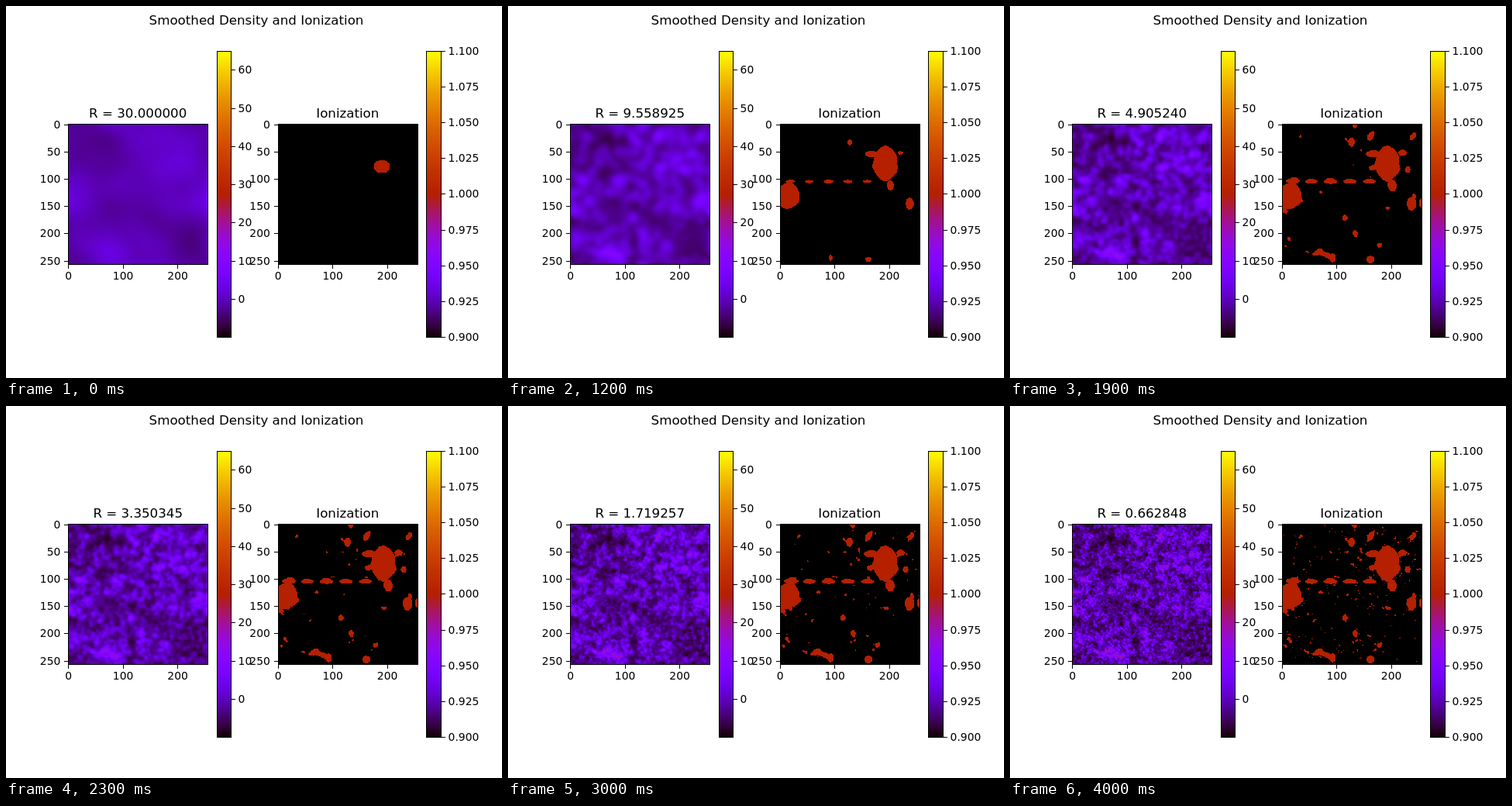
Write an HTML page with a canvas that moves like this. It is 640 px wide and 480 px high and loops after 4.1 s.

```html
<!DOCTYPE html>
<html lang="en">
<head>
<meta charset="utf-8">
<title>Smoothed Density and Ionization</title>
<style>
  html, body { margin: 0; width: 100%; height: 100%; overflow: hidden; background: #fff; }
  canvas, svg { position: absolute; left: 0; top: 0; width: 640px; height: 480px; }
  text { font-family: "DejaVu Sans", sans-serif; fill: #000; }
</style>
</head>
<body>
<canvas id="plot" width="640" height="480"></canvas>
<svg id="labels" viewBox="0 0 640 480"></svg>
<script>
const N = 256, STEPS = 41, STEP_MS = 100;
const TOP = 152.22, SIZE = 180.36, UNIT = SIZE / N;
const BAR_TOP = 57.6, BAR_BOTTOM = 427.2, BAR_H = BAR_BOTTOM - BAR_TOP;
const ctx = document.getElementById('plot').getContext('2d');
const svg = document.getElementById('labels');

const clamp = (v, lo, hi) => Math.max(lo, Math.min(hi, v));
const radius = n => 30 / 1.1 ** n;

// Colour map: r = sqrt(x), g = x^3, b = sin(2 pi x)
const rgb = x => [Math.sqrt(x), x ** 3, Math.max(0, Math.sin(2 * Math.PI * x))]
  .map(c => Math.round(255 * c));
const pack = ([r, g, b]) => (255 << 24 | b << 16 | g << 8 | r) >>> 0;
const palette = Array.from({ length: 256 }, (_, i) => rgb(i / 255));
const packed = Uint32Array.from(palette, pack);

// ---- Fields ----
let seed = 7331;
function random() {
  seed = seed + 0x6D2B79F5 | 0;
  let t = Math.imul(seed ^ seed >>> 15, 1 | seed);
  t = t + Math.imul(t ^ t >>> 7, 61 | t) ^ t;
  return ((t ^ t >>> 14) >>> 0) / 4294967296;
}

// Periodic box filter of fractional width; the result is transposed.
function boxPass(src, width) {
  const out = new Float32Array(N * N);
  const r = (width - 1) / 2, k = Math.floor(r), f = r - k;
  for (let y = 0; y < N; y++) {
    const row = y * N;
    let sum = 0;
    for (let i = -k; i <= k; i++) sum += src[row + (i & 255)];
    for (let x = 0; x < N; x++) {
      const next = src[row + (x + k + 1 & 255)];
      out[x * N + y] = (sum + f * (src[row + (x - k - 1 & 255)] + next)) / width;
      sum += next - src[row + (x - k & 255)];
    }
  }
  return out;
}

function blur(field, sigma) {
  for (let i = 0; i < 6; i++) field = boxPass(field, Math.max(1, 2 * sigma));
  return field;
}

const rms = f => Math.sqrt(f.reduce((s, v) => s + v * v, 0) / f.length);

function noise(sigma) {
  const white = Float32Array.from({ length: N * N }, () => random() + random() + random() - 1.5);
  const f = blur(white, sigma), scale = rms(f);
  return f.map(v => v / scale);
}

// Calls fn(index, u) near an ellipse, with u = 1 on its edge.
function around([cx, cy, rx, ry], reach, fn) {
  const x0 = Math.max(0, Math.ceil(cx - rx * reach)), x1 = Math.min(N - 1, cx + rx * reach);
  const y0 = Math.max(0, Math.ceil(cy - ry * reach)), y1 = Math.min(N - 1, cy + ry * reach);
  for (let y = y0; y <= y1; y++)
    for (let x = x0; x <= x1; x++)
      fn(y * N + x, Math.hypot((x - cx) / rx, (y - cy) / ry));
}

// Wide clumps and voids: x, y, strength
const clumps = [
  [55, 45, -.7], [190, 72, .3], [20, 125, .3], [100, 160, -.4], [160, 165, -.4], [240, 215, -.3], [75, 228, .25]
];

// The main bubble stretches from its first shape to its last one.
const firstShape = [189, 77, 15, 12], lastShape = [192, 71, 22, 32];
const mainBubble = n => {
  const p = Math.min(1, n / 10);
  return firstShape.map((v, i) => v + (lastShape[i] - v) * p);
};

// Other bubbles: x, y, rx, ry, and a chain across the left half
const bubbles = [
  [14, 130, 21, 23], [127, 33, 6, 8], [201, 111, 8, 11], [166, 54, 14, 7], [236, 145, 8, 12],
  [254, 143, 4, 8], [161, 246, 8, 7], [92, 243, 5, 8], [219, 52, 8, 5], [229, 83, 5, 6]
];
for (let x = 18; x < 165; x += 35) bubbles.push([x, 104, 12, 4.5]);

// A bubble appears once the smoothing radius falls to about its own size.
const meanRadius = ([, , rx, ry]) => Math.sqrt(rx * ry);
const birth = shape => Math.max(1, Math.log(30 / (1.2 * meanRadius(shape) + 2)) / Math.log(1.1));

function makeDensity() {
  const log = new Float32Array(N * N);
  for (let sigma = .7; sigma < 8; sigma *= 2)
    noise(sigma).forEach((v, i) => { log[i] += .24 * v; });
  noise(3.5).forEach((v, i) => { log[i] += .35 * (.8 - Math.abs(v)); });
  for (const [x, y, amp] of clumps)
    around([x, y, 22, 22], 3, (i, u) => { log[i] += amp * Math.exp(-u * u / 2); });
  for (const shape of bubbles)
    if (meanRadius(shape) < 15)
      around(shape, 2.5, (i, u) => { log[i] += .35 * Math.exp(-u * u); });
  return log.map(v => 10.5 * Math.exp((v > .9 ? .9 + (v - .9) / 2 : v) - .2) - 10);
}

function toCanvas(pixels) {
  const c = document.createElement('canvas');
  c.width = c.height = N;
  c.getContext('2d').putImageData(new ImageData(new Uint8ClampedArray(pixels.buffer), N, N), 0, 0);
  return c;
}

function makeSteps() {
  const density = makeDensity(), coarse = blur(density, 14);
  const black = pack([0, 0, 0]), red = pack(rgb(.5)), partial = pack(rgb(.16));
  const mask = new Uint32Array(N * N).fill(black);
  return Array.from({ length: STEPS }, (_, n) => {
    const smooth = blur(density, .6 * radius(n));
    const detail = smooth.map((v, i) => v - coarse[i]);
    const fill = (shape, grown) => around(shape, 1.4, (i, u) => {
      if (u < grown + .02 * Math.min(14, detail[i])) mask[i] = red;
    });
    fill(mainBubble(n), 1);
    for (const shape of bubbles) {
      const age = n - birth(shape);
      if (age >= 0) fill(shape, .6 + .4 * Math.min(1, age / 6));
    }
    // Dense peaks ionize on their own at small radii.
    if (n > 13) {
      const limit = 2.4 * rms(detail);
      detail.forEach((v, i) => { if (v > limit) mask[i] = red; });
    }
    const ion = mask.slice();
    if (n === STEPS - 1)
      for (let i = 0; i < 5; i++) ion[Math.floor(random() * N * N)] = partial;
    const pixels = Uint32Array.from(smooth, v =>
      packed[clamp(Math.floor((v + 10) / 75 * 256), 0, 255)]);
    return { density: toCanvas(pixels), ion: toCanvas(ion) };
  });
}

// ---- Axes and labels ----
function label(str, x, y, anchor = 'middle', size = 13.889) {
  const t = document.createElementNS('http://www.w3.org/2000/svg', 'text');
  const attrs = { x, y, 'text-anchor': anchor, 'font-size': size };
  for (const name in attrs) t.setAttribute(name, attrs[name]);
  t.textContent = str;
  svg.appendChild(t);
  return t;
}

const heading = (str, x, y) => label(str, x, y, 'middle', 16.667);

function frame(x, y, right, bottom) {
  ctx.strokeStyle = '#000';
  ctx.lineWidth = 1;
  ctx.strokeRect(x + .5, y + .5, right - x, bottom - y);
}

function drawAxes(left) {
  ctx.fillStyle = '#000';
  for (let v = 0; v <= 250; v += 50) {
    const y = Math.round(TOP + (v + .5) * UNIT);
    ctx.fillRect(Math.round(left) - 5, y, 5, 1);
    label(v, left - 9.7, y + 5, 'end');
  }
  for (let v = 0; v <= 200; v += 100) {
    const x = left + (v + .5) * UNIT;
    ctx.fillRect(Math.round(x), 334, 1, 5);
    label(v, x + .3, 353);
  }
}

function drawBar(left, right, min, max, first, tick, digits) {
  for (let y = 58; y < 428; y++) {
    const i = Math.floor((BAR_BOTTOM - y - .2) / BAR_H * 256);
    ctx.fillStyle = `rgb(${palette[clamp(i, 0, 255)]})`;
    ctx.fillRect(left, y, right - left, 1);
  }
  frame(left, 58, right, 427);
  ctx.fillStyle = '#000';
  for (let v = first; v <= max + 1e-9; v += tick) {
    const y = Math.round(BAR_BOTTOM - (v - min) / (max - min) * BAR_H);
    ctx.fillRect(right + 1, y, 5, 1);
    label(v.toFixed(digits), right + 9.6, y + 5, 'start');
  }
}

ctx.fillStyle = '#fff';
ctx.fillRect(0, 0, 640, 480);
ctx.imageSmoothingEnabled = false;
drawBar(272, 290, -10, 65, 0, 10, 0);
drawBar(542, 561, .9, 1.1, .9, .025, 3);
drawAxes(80);
drawAxes(350.55);
heading('Smoothed Density and Ionization', 323, 24);
heading('Ionization', 440.8, 144);
const title = heading('', 170.2, 144);

// ---- Playback ----
const steps = makeSteps();
let shown = -1;

function drawPanel(image, left) {
  ctx.drawImage(image, left, 152, 181, 182);
  frame(left, 152, left + 180, 333);
}

function show(n) {
  if (n === shown) return;
  shown = n;
  title.textContent = 'R = ' + radius(n).toFixed(6);
  drawPanel(steps[n].density, 80);
  drawPanel(steps[n].ion, 351);
}

const start = performance.now();
function tick() {
  const t = (performance.now() - start) % (STEPS * STEP_MS);
  show(Math.floor(t / STEP_MS));
  requestAnimationFrame(tick);
}
show(0);
requestAnimationFrame(tick);
</script>
</body>
</html>
```
